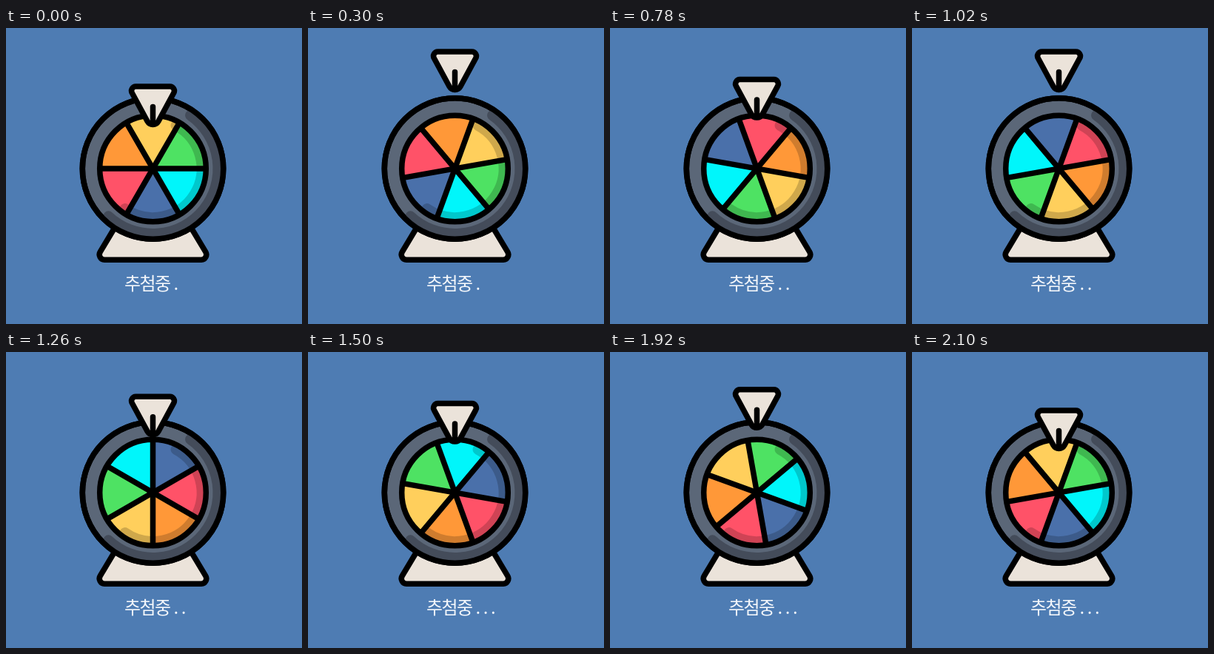
These frames come from a looping animation (400 px wide and 400 px high, 2160 ms). An HTML page:

```html
<!DOCTYPE html>
<html lang="ko">
<head>
<meta charset="utf-8">
<style>
html, body { margin: 0; width: 100%; height: 100%; overflow: hidden; background: #4e7cb3; }
svg { display: block; width: 100%; height: 100%; }
.line { stroke: #000; stroke-width: 7.5; stroke-linecap: round; stroke-linejoin: round; }
.cream { fill: #ebe3da; }
.shade { fill: none; stroke-width: 14; stroke-linecap: round; }
text { font: 24px "Noto Sans CJK KR", "Noto Sans CJK", sans-serif; letter-spacing: -1.6px; fill: #f4f7fb; white-space: pre; }
</style>
</head>
<body>
<svg viewBox="0 0 400 400">
  <path class="line cream" d="M148 268L127.3 302.5A7 7 0 0 0 133 313.2H264A7 7 0 0 0 269.7 302.5L249 268Z"/>
  <g transform="translate(198.5 190)">
    <circle class="line" r="95.2" fill="#5b6778"/>
    <path class="shade" id="rimShade" stroke="#444c5a"/>
    <circle class="line" r="95.2" fill="none"/>
    <g id="sectors"></g>
    <path class="shade" id="discShade" stroke="#000" stroke-opacity=".19"/>
    <g id="spokes" class="line"></g>
    <circle class="line" r="71.8" fill="none"/>
  </g>
  <g id="needle" class="line">
    <path class="cream" d="M176 79H221A6 6 0 0 1 226.4 88.3L206 126A8.6 8.6 0 0 1 191 126L170.6 88.3A6 6 0 0 1 176 79Z"/>
    <path d="M198.5 106.5V126"/>
  </g>
  <text id="label" x="160" y="353.5"></text>
</svg>
<script>
const el = id => document.getElementById(id);
const polar = (r, deg) => {
  const a = deg * Math.PI / 180;
  return `${(r * Math.cos(a)).toFixed(2)} ${(r * Math.sin(a)).toFixed(2)}`;
};
const arc = (r, from, to) =>
  `M${polar(r, from)}A${r} ${r} 0 ${to - from > 180 ? 1 : 0} 1 ${polar(r, to)}`;

// Clockwise from the top
const colors = ["#ffcf5c", "#4ee263", "#00f6fb", "#4a70aa", "#ff5268", "#ff9838"];
el("sectors").innerHTML = colors.map((c, i) =>
  `<path fill="${c}" d="${arc(72, i * 60 - 120, i * 60 - 60)}L0 0Z"/>`).join("");
el("spokes").innerHTML = [0, 60, 120].map(a =>
  `<path d="M${polar(71, a)}L${polar(71, a + 180)}"/>`).join("");
el("rimShade").setAttribute("d", arc(88, -55, 133));
el("discShade").setAttribute("d", arc(66, -62, 125));

const STEP = 60, STEPS = 36, BOUNCE = 12;

function draw(now) {
  const step = Math.floor(now / STEP) % STEPS;
  const phase = step % BOUNCE;
  const lift = 9.4 * Math.min(phase, BOUNCE - 1 - phase);
  for (const id of ["sectors", "spokes"])
    el(id).setAttribute("transform", `rotate(${step * 10})`);
  el("needle").setAttribute("transform", `translate(0 ${-lift})`);
  el("label").textContent = "추첨중" + " .".repeat(1 + Math.floor(step / BOUNCE));
}

const start = performance.now();
function tick() {
  draw(performance.now() - start);
  requestAnimationFrame(tick);
}
tick();
</script>
</body>
</html>
```
